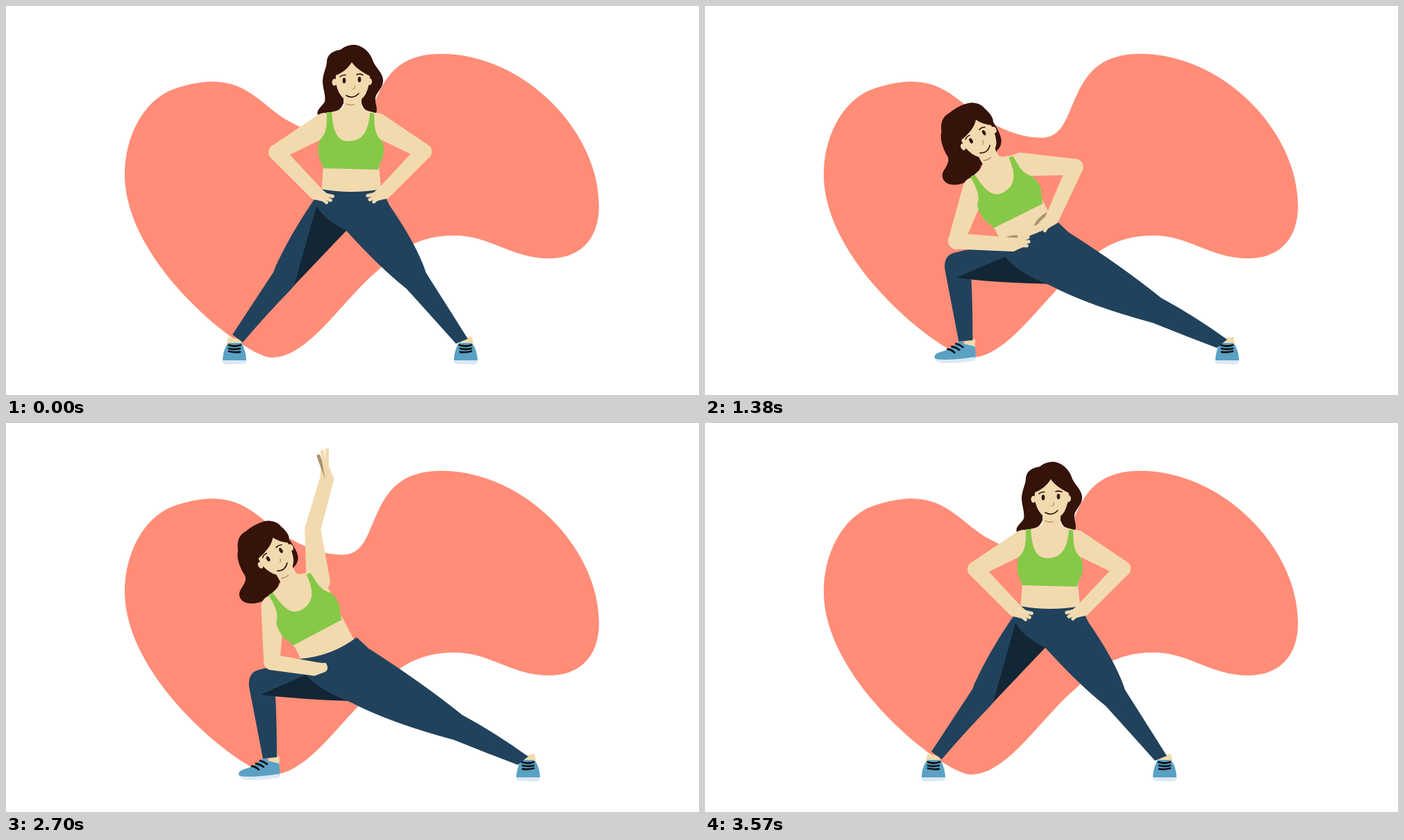
Write an HTML page with a canvas that moves like this. It is 998 px wide and 561 px high and loops after 3.6 s.

```html
<!DOCTYPE html>
<html>
<head>
<meta charset="utf-8">
<style>
html, body { margin: 0; overflow: hidden; background: #fff; }
canvas { display: block; }
</style>
</head>
<body>
<canvas id="stage" width="998" height="561"></canvas>
<script>
const ctx = document.getElementById('stage').getContext('2d');
const SKIN = '#f2daaf', NAVY = '#21425c', SHADE = '#132635', HAIR = '#35120a';
const GREEN = '#85c947', SHOE = '#5aa1c4', SOLE = '#dce9f5', BROWN = '#ab9270', INK = '#111418';
const LOOP = 3600;

const BLOB = 'M171 243C171 191 196 137 241 120C258 114 278 109 297 109C352 109 370 147 411 168' +
  'C435 181 460 190 484 190C516 190 520 160 536 127C552 92 575 69 627 69C745 69 854 180 854 288' +
  'C854 340 823 364 783 364C725 364 700 331 645 331C590 331 560 357 536 381' +
  'C484 424 436 507 383 507C346 507 171 373 171 243Z';

// Leg shapes: standing, halfway, lunge, lunge with side bend
const FRONT_LEG = [
  'M454 264Q497 272 541 264L552 287Q592 345 605 385Q640 440 665 480L648 487Q615 450 577 408Q538 377 490 324Q458 308 447 288Z',
  'M454 292Q497 300 541 292L553 308Q600 352 632 399Q675 440 709 481L692 489Q655 460 612 430Q565 408 492 352Q463 340 453 317Z',
  'M455 341Q497 343 541 342L556 351Q610 380 657 421Q705 447 752 481L737 493Q692 476 645 457Q545 432 491 400Q460 378 452 352Z',
  'M424 340Q470 336 505 309L522 325Q600 375 657 421Q705 447 752 481L737 493Q692 476 645 457Q552 432 497 403Q450 385 432 363Z'];
const BACK_LEG = [
  'M454 266L441 283Q408 332 388 376Q387 380 385 384L326 474L341 485Q375 445 411 408L416 402L470 300Z',
  'M454 296L440 310Q395 340 358 372Q351 379 349 390L326 489L344 493Q365 440 383 401L390 396L470 325Z',
  'M456 343L440 339Q388 345 350 355Q333 359 336 380L356 483L376 482Q376 430 374 394L385 390L475 365Z',
  'M440 340L412 347Q385 350 364 356Q348 360 350 380L370 484L390 482Q390 430 388 393L398 390L470 370Z'];
const INNER_THIGH = [
  'M447 289Q485 295 490 324Q452 364 415 403Z',
  'M453 317Q490 325 494 351Q430 378 377 401Z',
  'M452 350Q485 370 491 400Q420 402 352 392Z',
  'M432 363Q480 370 497 401Q430 399 366 392Z'];
const BELLY = [
  'M457 230L537 232L541 272L454 272Z', 'M457 258L537 260L541 300L454 300Z',
  'M457 304L537 306L541 348L454 348Z', 'M412 316L484 280L505 320L430 351Z'];
const HAIR_SHAPE = [
  'M501 56C512 56 524 66 528 78C531 88 542 95 543 106C544 118 533 124 532 133C531 140 536 147 533 155C520 155 514 148 512 140L486 140C482 152 470 158 449 157C446 150 456 144 459 138C461 130 456 118 456 108C457 95 462 88 462 80C463 67 475 64 482 63C488 58 494 56 501 56Z',
  'M513 59C520 63 525 68 526 75C529 83 531 93 527 98C528 106 529 118 526 126C524 130 520 135 513 136C512 138 510 139 505 140L483 146C475 156 448 162 432 150C422 144 422 132 430 127C440 122 446 118 446 112C445 95 449 82 455 76C460 64 466 57 478 57C490 55 503 55 513 59Z'];
const FACE = [
  'M498 81C492 91 483 97 475 100C474 112 477 122 483 130C489 137 494 140 499 140C506 140 514 134 518 127C522 118 524 110 524 101C514 96 504 90 498 81Z',
  'M508 84C502 92 490 97 475 100C474 112 477 122 483 130C489 137 494 140 499 140C506 140 514 134 518 127C522 118 523 110 523 101C518 97 512 92 508 84Z'];
const CHEST = 'M486 130V145C484 151 468 152 455 157L452 200L457 236H537L542 200L540 157C528 152 514 151 512 145V130Z';
const BRA = 'M462 153L469 153C471 175 474 195 493 195C514 195 522 180 524 154L530 155C531 172 530 184 541 194' +
  'C547 208 543 220 538 228L536 236L457 234L455 228C449 218 448 204 452 193C462 184 462 172 462 153Z';

const lerp = (a, b, k) => a + (b - a) * k;
const clamp = (v, a, b) => Math.min(b, Math.max(a, v));
const ramp = (t, a, b) => { const u = clamp((t - a) / (b - a), 0, 1); return u * u * (3 - 2 * u); };
const rad = deg => deg * Math.PI / 180;
const polar = (p, deg, len) => [p[0] + len * Math.cos(rad(deg)), p[1] + len * Math.sin(rad(deg))];

// Value or path between neighbouring keys
function at(keys, pos) {
  const i = clamp(Math.floor(pos), 0, keys.length - 2), k = pos - i;
  if (typeof keys[0] === 'number') return lerp(keys[i], keys[i + 1], k);
  const next = keys[i + 1].match(/-?\d+/g);
  let n = 0;
  return keys[i].replace(/-?\d+/g, v => lerp(+v, +next[n++], k).toFixed(2) + ' ');
}

function fill(path, color) {
  ctx.fillStyle = color;
  ctx.fill(new Path2D(path));
}

function line(path, color, width) {
  ctx.strokeStyle = color;
  ctx.lineWidth = width;
  ctx.lineCap = 'round';
  ctx.stroke(new Path2D(path));
}

function oval(x, y, rx, ry, color) {
  ctx.fillStyle = color;
  ctx.beginPath();
  ctx.ellipse(x, y, rx, ry, 0, 0, 7);
  ctx.fill();
}

function taper(p, q, r1, r2) {
  const a = Math.atan2(q[1] - p[1], q[0] - p[0]), h = Math.PI / 2;
  ctx.fillStyle = SKIN;
  ctx.beginPath();
  ctx.arc(p[0], p[1], r1, a + h, a + 3 * h);
  ctx.arc(q[0], q[1], r2, a - h, a + h);
  ctx.fill();
}

function placed(x, y, flip, draw) {
  ctx.save();
  ctx.translate(x, y);
  ctx.scale(flip, 1);
  draw();
  ctx.restore();
}

function frontShoe() {
  fill('M-9 -40L9 -36L10 -26L-12 -26Z', SKIN);
  fill('M-17 -6C-17 -14 -14 -27 -8 -31L10 -31C14 -25 17 -14 17 -6Z', SHOE);
  fill('M-17 -6L17 -6Q18 0 10 -1L-10 0Q-18 0 -17 -6Z', SOLE);
  line('M-8 -28Q0 -25 9 -28M-8 -23Q0 -21 8 -23M-8 -19Q0 -17 8 -18', INK, 2.8);
}

function sideShoe() {
  fill('M44 -36L59 -34L58 -18L42 -18Z', SKIN);
  fill('M0 -9C2 -17 14 -16 22 -21L36 -32Q40 -33 42 -28L58 -24Q60 -14 59 -6L10 -4Q0 -4 0 -9Z', SHOE);
  fill('M1 -6Q20 -3 59 -9L58 -3Q35 0 20 0Q2 0 1 -6Z', SOLE);
  line('M19 -20Q24 -20 29 -15M25 -24Q31 -23 36 -19M31 -28Q36 -27 41 -23', INK, 2.8);
}

function face(lean) {
  oval(473, 110, 3.5, 5, SKIN);
  oval(523.5, 109, 3.5, 5, SKIN);
  fill(at(FACE, lean), SKIN);
  oval(487, 107.5, 2.3, 4, HAIR);
  oval(509, 106, 2.3, 4, HAIR);
  line('M481 102Q484 99 489 99.5M505 99Q509 97 514 99.5', HAIR, 1.6);
  line('M502 115Q503 119 499 120', '#b98a62', 1.2);
  line('M490 129Q500 135 508 126', HAIR, 1.6);
  line('M490 141Q495 144 501 142', '#b5835f', 1.3);
}

// side is -1 for the arm on the left of the stage
function arm(side, shoulder, angles, lengths, spread, reach) {
  const elbow = polar(shoulder, angles[0], lengths[0]);
  const wrist = polar(elbow, angles[1], lengths[1]);
  return {
    upper: () => taper(shoulder, elbow, 17, 11.5),
    lower(shaded) {
      taper(elbow, wrist, 11.5, 10);
      taper(wrist, polar(wrist, angles[2], 13), 10, 7);
      [21, 24, 25].forEach((len, i) => {
        const tip = polar(wrist, angles[2] + side * (i - 1) * spread, len * reach);
        line(`M${wrist}L${tip}`, shaded && !i ? BROWN : SKIN, 5);
      });
    }
  };
}

function draw(t) {
  const drop = 2 * (ramp(t, 480, 900) - ramp(t, 3240, 3550));
  const lean = ramp(t, 960, 1450) - ramp(t, 3030, 3255);
  const slide = ramp(t, 930, 1660) - ramp(t, 2930, 3260);
  const raise = ramp(t, 1650, 2190) - ramp(t, 2580, 2990);
  const pose = drop + lean, leg = drop + slide, reach = lean + raise;

  const cx = at([497, 497, 497, 449], pose), cy = at([235, 263, 309, 302], pose);
  const tilt = rad(-29.5 * lean), cos = Math.cos(tilt), sin = Math.sin(tilt);
  const onBody = (x, y) => [cx + (x - 497) * cos - (y - 235) * sin, cy + (x - 497) * sin + (y - 235) * cos];
  const body = f => {
    ctx.save();
    ctx.translate(cx, cy);
    ctx.rotate(tilt);
    ctx.translate(-497, -235);
    f();
    ctx.restore();
  };
  const left = arm(-1, onBody(459, 171),
    [at([150, 107, 87], reach), at([46, 1, 11], reach), at([27, -12, -5], reach)],
    [80, at([81, 81, 56], reach)], 15, at([1, 1, .6], reach));
  const right = arm(1, onBody(534, 171),
    [at([30, 1, -122], reach), at([134, 113, -124], reach), at([153, 135, -162], reach)],
    [at([78, 79, 74], reach), at([81, 81, 74], reach)], at([15, 15, 9], reach), at([1, 1, 1.85], reach));

  ctx.fillStyle = '#fff';
  ctx.fillRect(0, 0, 998, 561);
  fill(BLOB, '#ff8d78');

  body(() => fill(at(HAIR_SHAPE, lean), HAIR));
  left.upper();
  right.upper();
  body(() => fill(CHEST, SKIN));
  fill(at(BELLY, pose), SKIN);
  body(() => {
    fill(BRA, GREEN);
    face(lean);
    if (drop > 1.7 && raise < .3) line('M457 257Q468 254 480 260M513 258Q522 252 536 252', BROWN, 4.5);
  });

  if (leg < .3) placed(329, 517, 1, frontShoe);
  else placed(at([279, 285, 321, 335], leg), at([517, 523, 515, 515], leg), 1, sideShoe);
  placed(662 + 45 * drop, 517, -1, frontShoe);
  fill(at(BACK_LEG, leg), NAVY);
  fill(at(INNER_THIGH, leg), SHADE);
  fill(at(FRONT_LEG, pose), NAVY);

  left.lower();
  right.lower(raise > .5);
  if (raise > .8) {
    line('M379 341Q384 332 394 333', BROWN, 1.5);
    line('M460 343Q462 350 459 357', BROWN, 2);
  }
}

function tick(now) {
  draw(now % LOOP);
  requestAnimationFrame(tick);
}
draw(0);
requestAnimationFrame(tick);
</script>
</body>
</html>
```
